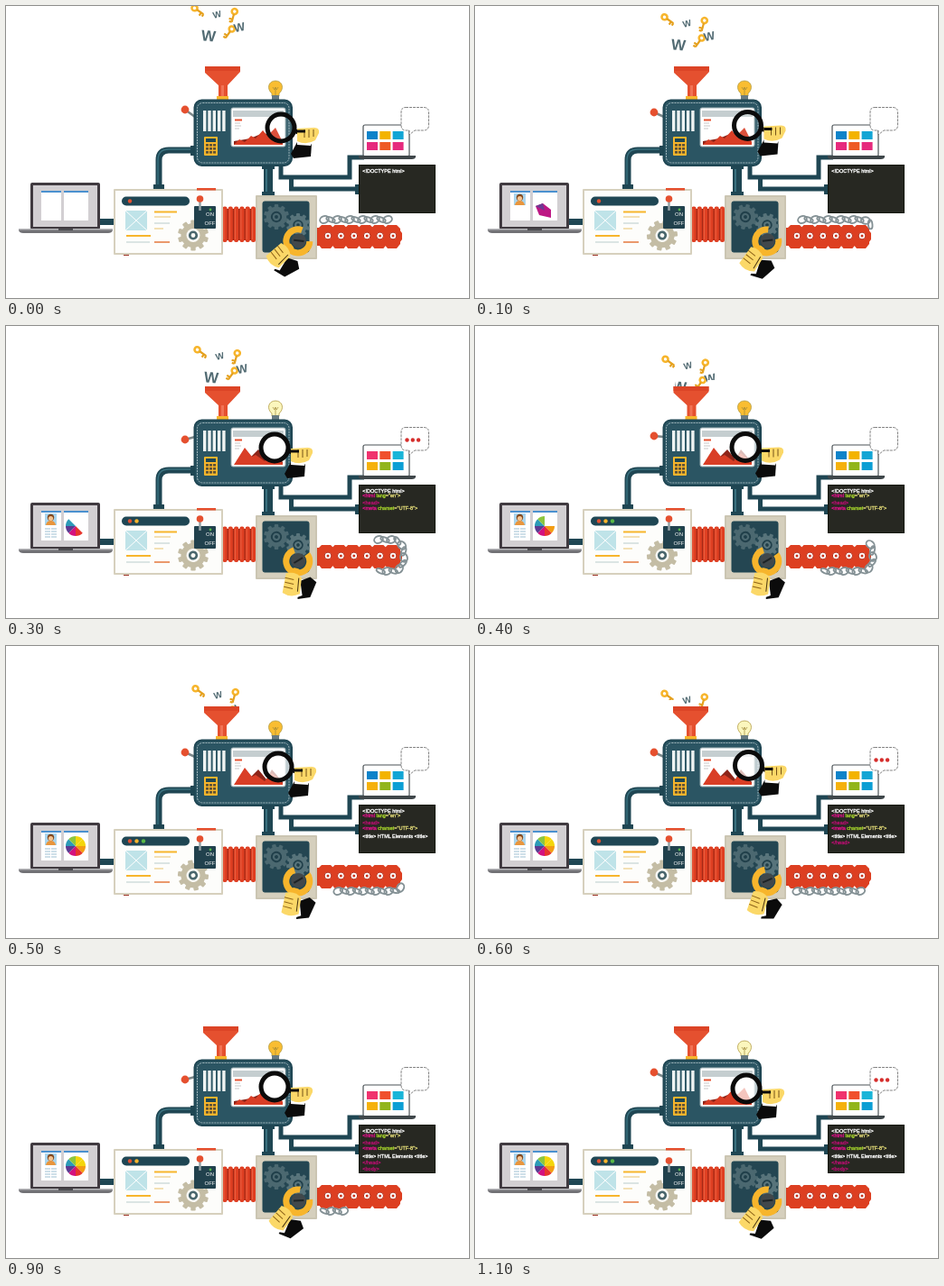
Animation, 512 px wide and 324 px high, one loop 1.2 s. Source, as an HTML page:

```html
<!DOCTYPE html>
<html lang="en">
<head>
<meta charset="utf-8">
<title>Web machine</title>
<style>
  html, body { margin: 0; width: 100%; height: 100%; overflow: hidden; background: #fff; }
  svg { display: block; width: 512px; height: 324px; }
  text { font-family: "Liberation Sans", Arial, sans-serif; }
</style>
</head>
<body>
<svg id="stage" viewBox="0 0 512 324"></svg>
<script>
const TEAL = '#2b5563', DARK = '#1f4653', RED = '#e5502f', BEIGE = '#d6d0bd';
const YELLOW = '#f7b52c', SKIN = '#fbd868', BLACK = '#0b0b0b';
const STEPS = 12, STEP_MS = 100;
const KEY_STEPS = [0, 2, 3, 5, 7, 9, 11];
const stage = document.getElementById('stage');

const rect = (x, y, w, h, fill, extra = '') =>
  `<rect x="${x}" y="${y}" width="${w}" height="${h}" fill="${fill}" ${extra}/>`;
const circle = (x, y, r, fill, extra = '') =>
  `<circle cx="${x}" cy="${y}" r="${r}" fill="${fill}" ${extra}/>`;
const path = (d, fill, extra = '') => `<path d="${d}" fill="${fill}" ${extra}/>`;
const line = (d, color, width, extra = '') =>
  path(d, 'none', `stroke="${color}" stroke-width="${width}" ${extra}`);
const group = (id, body, extra = '') => `<g id="${id}" ${extra}>${body}</g>`;
const repeat = (n, make) => Array.from({ length: n }, (_, i) => make(i)).join('');

function gear(id, x, y, r, fill, hub, core) {
  const teeth = repeat(10, i =>
    rect(-r * .16, -r, r * .32, r * .4, fill, `rx="1" transform="rotate(${i * 36})"`));
  return `<g transform="translate(${x} ${y})">` + group(id,
    teeth + circle(0, 0, r * .8, fill) + circle(0, 0, r * .44, hub) +
    circle(0, 0, r * .3, core) + circle(0, 0, r * .14, hub)) + '</g>';
}

function pipes() {
  return line('M208 160H180Q169 160 169 171V204', DARK, 7) +
    line('M208 159H180Q168 159 168 171V202', '#39707e', 1.5) +
    rect(204, 155, 5, 11, DARK) + rect(163, 198, 12, 5, DARK) +
    line('M290 176V211', DARK, 10) + line('M288 178V209', '#39707e', 2) +
    rect(283, 177, 14, 4, DARK) + rect(283, 206, 14, 4, DARK) +
    line('M304 177V190H380V168H396', DARK, 5) +
    line('M315.5 190V203H391', DARK, 5) + rect(386, 198, 4, 11, DARK) +
    rect(102, 236, 18, 7, DARK);
}

function leftLaptop() {
  const page = (x, w) => rect(x, 206, w, 32, '#fff') + rect(x, 205, w, 2, '#4a90cf');
  const colors = ['#f4d50b', '#f4d50b', '#f39c12', '#e7352c', '#d3127f', '#5b3a91', '#2c9ab8', '#8cc63f'];
  const slice = i => {
    const p = a => `${77 + 11 * Math.sin(a)} ${222 - 11 * Math.cos(a)}`;
    return path(`M77 222L${p(i * Math.PI / 4)}A11 11 0 0 1 ${p((i + 1) * Math.PI / 4)}Z`, colors[i], 'class="slice"');
  };
  const person = rect(43, 208, 13, 13, '#a9d5ee') + circle(49.5, 212.5, 3.7, '#83481d') +
    circle(49.5, 213.5, 2.6, '#f4c391') + path('M44 221q1-5 5.5-5t5.5 5z', '#e8963e');
  const notes = repeat(4, i => line(`M43 ${225 + i * 3}h13`, '#9dbfd2', 1, 'stroke-dasharray="6 1"'));
  return rect(27, 196, 77, 52, '#403a40', 'rx="2"') + rect(30, 199, 71, 46, '#d2cfd2') +
    page(39, 22) + page(64, 27) + group('person', person) + group('notes', notes) +
    group('bloom', path('M67 222l8-3 9 7v9l-13-3z', '#bd1784') + path('M67 222l8-3 2 8z', '#6d3a92')) +
    group('pie', repeat(8, slice)) +
    path('M14 247H118V249Q117 252 113 252H19Q15 252 14 249Z', '#727276') + rect(14, 247, 104, 1.5, '#b6b6b9') +
    rect(58, 247, 16, 2, '#4c4c50');
}

function controlBox() {
  return rect(119, 203, 121, 73, BEIGE, 'rx="1"') + rect(121, 205, 117, 69, '#fdfdfb') +
    rect(211, 202, 21, 2.5, RED) + rect(130, 276, 6, 1, '#9b3021') +
    rect(128, 211.5, 75, 10, DARK, 'rx="5"') +
    repeat(3, i => circle(137 + i * 7.5, 216.5, 2.2, [RED, YELLOW, '#58b947'][i], 'class="light"')) +
    rect(132, 227, 24, 22, '#bfe3e8') + line('M132 227l24 22m0-22l-24 22', '#fff', 1) +
    line('M164 228.5h25M133 255h27', YELLOW, 1.8) + line('M164 262h17', '#e5793c', 1.5) +
    line('M164 241h17M133 262h26', '#b9cccb', 1) + line('M164 234h18M164 247h10', '#e9c36c', 1) +
    gear('beigeGear', 207, 254.5, 17, '#c4bda5', '#fbfaf5', '#49666d') +
    rect(208, 222, 24, 25, '#21414d', 'rx="1"') +
    group('switch', line('M214.5 214V227', '#93a0a4', 2.5) + circle(214.5, 214, 3.8, RED)) +
    circle(226, 226, 1.4, '#53b84a') +
    `<text x="221" y="233" font-size="6" fill="#fff">ON</text><text x="219.5" y="243" font-size="6" fill="#fff">OFF</text>`;
}

function bellows() {
  return rect(239, 225, 38, 35, '#a52a17') +
    repeat(6, i => rect(239.5 + i * 6.3, 222.5, 5, 39.5, '#df3f22', 'rx="2"') +
      line(`M${241 + i * 6.3} 225v34`, '#ea6242', 1));
}

function wrenchBox() {
  const wrench = rect(-4, 8, 8, 24, YELLOW, 'rx="2"') +
    line('M-7 -11A13 13 0 1 0 8 -10', YELLOW, 7) +
    circle(0, -1, 8, '#41484b') + line('M-4 3L4 -5', '#1d2326', 2);
  const arm = path('M4 23L17 14L25 18L22 36L9 41Z', BLACK) + path('M2 25L7 20L13 36L7 40Z', '#fff') +
    path('M-10 16q10-5 18 1l2 18q-9 7-19 3z', SKIN) +
    line('M-10 21h10M-9 26h10M-9 31h10', '#8d6218', 1) + line('M5 18L7 33', '#4a3511', 1);
  return rect(276, 210, 68, 71, '#cbc5b2', 'rx="1"') + rect(278, 212, 64, 67, '#d5cfbd') +
    rect(284, 217, 51, 56, '#244652', `rx="2" stroke="${DARK}"`) +
    gear('gearA', 299, 234, 14, '#4b6870', '#203f4a', '#4b6870') +
    gear('gearB', 323, 243, 13, '#58747b', '#203f4a', '#58747b') + group('wrench', wrench + arm);
}

function conveyor() {
  const plate = i => {
    const x = 354 + i * 14.6;
    return path(`M${x - 9} 247l4-4h10l4 4v17l-4 5h-10l-4-5z`, '#dd3f21');
  };
  const bolt = i => circle(356 + i * 14.4, 255, 3.9, '#fff', 'stroke="#b52d19" stroke-width="1"') +
    circle(356 + i * 14.4, 255, 1.5, '#c9351d');
  return rect(344, 246, 88, 20, '#d33a1f') + repeat(6, plate) +
    path('M427 244h5l6 8v7l-6 8h-5z', '#dd3f21') + repeat(6, bolt) +
    line('M346 237H426Q440 237 440 255Q440 272 426 272H346', 'none', 0, 'id="chainPath"') + group('chain', '');
}

function machine() {
  const bulb = path('M298 83C290 83 288 92 294 97V100H302V97C308 92 306 83 298 83Z', '#fbf3ad', 'id="bulb" stroke="#b39c43" stroke-width=".8"') +
    line('M295 90l2 3 1-3 1 3 2-3M298 93v6', '#9e8739', .7) + rect(294, 99, 8, 5, '#687b80');
  const calculator = rect(219, 145, 15, 21, YELLOW, 'rx="1"') + rect(221, 147, 11, 4, DARK) +
    repeat(9, i => rect(221 + i % 3 * 4, 153 + Math.floor(i / 3) * 4, 3, 2.6, '#5d5136'));
  const screen = rect(249, 113, 60, 43, '#fff', 'rx="2" stroke="#9cafb3"') + rect(251, 116, 56, 7, '#c5ced0') +
    line('M253 126.5h8', RED, 2) + line('M253 130h6M253 133h7M253 136h5', '#c8c5c5', 1) +
    path('', '#8d2519', 'id="ridge"') + path('', '#d93e26', 'id="chart"');
  const lens = circle(0, 0, 15.5, '#fff', 'id="lens"') + circle(0, 0, 15, 'none', `stroke="${BLACK}" stroke-width="5"`);
  const hand = line('M14 3L24 7', BLACK, 5) + path('M18 16L34 18L33 32L14 34L11 29Z', BLACK) +
    path('M18 15L34 17L33 20L18 19Z', '#fff') +
    path('M18 1L37 0Q43 0 42 6L38 14Q28 20 18 15Z', SKIN) +
    line('M26 2v9M31 2v9M36 2v8', '#755318', 1) + line('M18 4h9', BLACK, 3);
  return line('', '#7b8789', 2.5, 'id="stem"') + circle(198, 0, 4.4, RED, 'id="knob"') +
    bulb + rect(208.5, 104.5, 107.5, 72.5, TEAL, `rx="8" stroke="${DARK}" stroke-width="2"`) +
    rect(211.5, 107.5, 101.5, 66.5, 'none', 'rx="6" stroke="#9fb5bb" stroke-width="1" stroke-dasharray="2 1"') +
    repeat(5, i => rect(218 + i * 5.3, 116, 3.4, 23, '#eef3f2')) + calculator + screen +
    group('magnifier', lens + hand);
}

function funnel() {
  return group('funnel', path('M220 67H259V73L245 88V101H235V88L220 74Z', RED) +
    path('M220 67H259V72H220Z', '#dc4426') + path('M238 88h3v13h-3z', '#f17254') + rect(233, 100, 13, 4, YELLOW));
}

function fallingItems() {
  const key = (x, y, a) => `<g transform="translate(${x} ${y}) rotate(${a})">` +
    circle(-3, 0, 3, 'none', `stroke="${YELLOW}" stroke-width="2.6"`) + line('M0 0H9M6 0V4M9 0V3', '#e5a11f', 2.2) + '</g>';
  const letter = (x, y, a, size) =>
    `<text transform="translate(${x} ${y}) rotate(${a})" text-anchor="middle" y="5" font-size="${size}" font-weight="bold" fill="#526b73">W</text>`;
  return `<clipPath id="mouth"><path d="M190 0H280V60H257V67H221V60H190Z"/></clipPath><g clip-path="url(#mouth)">` +
    group('items', key(211, 4, 35) + letter(233, 8, -15, 10) + key(252, 9, 105) +
      letter(224, 34, 5, 17) + key(248, 28, 125) + letter(258, 23, -12, 13)) + '</g>';
}

function rightLaptop() {
  return rect(395, 132, 51, 35, '#fff', 'rx="2" stroke="#4b5357" stroke-width="1.2"') +
    repeat(6, i => rect(399 + i % 3 * 14.3, i < 3 ? 139 : 151, 12, 9, '#fff', 'class="tile"')) +
    path('M390 166H453V168Q452 170 449 170H394Q391 170 390 168Z', '#3f474a') +
    path('M442 112.5H462Q467.5 112.5 467.5 118V132Q467.5 138 462 138H452L446 143V138H442Q437 138 437 132V118Q437 112.5 442 112.5Z',
      '#fff', 'stroke="#777" stroke-width=".9" stroke-dasharray="3 1"') +
    group('dots', repeat(3, i => circle(443.5 + i * 6.3, 126.5, 2.2, '#d52d2b')));
}

function terminal() {
  const PINK = '#e0128a', LIME = '#a6d52b', WHITE = '#fff', PLUM = '#b80f70';
  const rows = [
    [185.4, ['<!DOCTYPE html>', WHITE]],
    [190, ['<html ', PINK], ['lang', LIME], ['="en">', '#e5dd79']],
    [198, ['<head>', PLUM]],
    [204.3, ['<meta ', PINK], ['charset', LIME], ['="UTF-8">', '#e5dd79']],
    [213, ['<title> HTML Elements <title>', WHITE]],
    [220, ['</head>', PLUM]],
    [226.5, ['<body>', PLUM]],
  ];
  const escape = s => s.replace(/</g, '&lt;').replace(/>/g, '&gt;');
  return rect(390.5, 176.5, 84, 53, '#272822', 'stroke="#15180f"') + rows.map(([y, ...parts]) =>
    `<text class="code" x="394.3" y="${y}" font-size="5.5" xml:space="preserve">` + parts.map(([s, color]) =>
      `<tspan fill="${color}" stroke="${color}" stroke-width=".3">${escape(s)}</tspan>`).join('') + '</text>').join('');
}

stage.innerHTML = pipes() + leftLaptop() + bellows() + controlBox() + conveyor() + wrenchBox() +
  fallingItems() + funnel() + machine() + rightLaptop() + terminal();

const $ = id => document.getElementById(id);
const all = name => [...stage.querySelectorAll('.' + name)];
const lights = all('light'), tiles = all('tile'), slices = all('slice'), codeRows = all('code');
const chainLength = $('chainPath').getTotalLength();
const show = (node, on) => { node.style.display = on ? '' : 'none'; };
const set = (id, name, value) => $(id).setAttribute(name, value);
const transform = (id, value) => set(id, 'transform', value);

// Linear blend between the poses held at KEY_STEPS.
function pose(step, values) {
  const i = Math.max(1, KEY_STEPS.findIndex(k => k >= step));
  const u = (step - KEY_STEPS[i - 1]) / (KEY_STEPS[i] - KEY_STEPS[i - 1]);
  return values[i - 1] + (values[i] - values[i - 1]) * u;
}

function drawChain(step) {
  const tail = pose(step, [6, 26, 66, 120, 142, 184, 222]);
  const head = Math.min(chainLength, pose(step, [82, 116, 148, 196, 214, 214, 214]));
  let links = '';
  for (let s = tail, i = 0; s <= head; s += 7, i++) {
    const p = $('chainPath').getPointAtLength(s), q = $('chainPath').getPointAtLength(s + 1);
    const angle = Math.atan2(q.y - p.y, q.x - p.x) * 180 / Math.PI + (i % 2 ? 25 : -20);
    links += `<ellipse rx="5" ry="${i % 2 ? 2.3 : 3.8}" fill="none" stroke="#849195" stroke-width="1.9" transform="translate(${p.x} ${p.y}) rotate(${angle})"/>`;
  }
  $('chain').innerHTML = links;
}

function paintTiles(pair) {
  const cool = ['#0e83c9', '#f3b300', '#12a5d5'], warm = ['#f0326e', '#f0502c', '#1ab5d8'];
  const pinks = ['#e62a7d', '#ee5a24', '#e62a7d'], mixed = ['#f5b10c', '#91b51b', '#0b9ed4'];
  const top = [0, 2, 3].includes(pair) ? cool : warm;
  const bottom = pair === 0 ? pinks : mixed;
  tiles.forEach((tile, i) => tile.setAttribute('fill', [...top, ...bottom][i]));
}

function render(step) {
  const pair = Math.floor(step / 2), even = pair % 2 === 0;
  lights.forEach((light, i) => show(light, i <= pair % 3));
  set('bulb', 'fill', even ? '#f9bd32' : '#fbf6bd');
  show($('dots'), !even);
  paintTiles(pair);

  const turn = step * 12;
  transform('beigeGear', `rotate(${turn})`);
  transform('gearA', `rotate(${turn})`);
  transform('gearB', `rotate(${-turn})`);
  transform('wrench', `translate(323 261) rotate(${pose(step, [52, 25, 13, 15, 28, 43, 40])})`);
  transform('magnifier', `translate(${pose(step, [304, 299, 297, 301, 304, 297, 300])} ${pose(step, [135, 130, 135, 134, 131, 134, 136])})`);
  const knobY = pose(step, [115, 121, 126, 118, 118, 126, 118]);
  set('knob', 'cy', knobY);
  set('stem', 'd', `M198 ${knobY}L209 123`);
  transform('switch', `translate(0 ${step === 2 || step === 11 ? 2 : 0})`);
  transform('funnel', `translate(${pose(step, [0, 0, 0, -1, -1, -2, 0])} 0)`);
  transform('items', `translate(${pose(step, [0, 2, 3, 1, 1, 0, 0])} ${pose(step, [0, 20, 24, 45, 56, 75, 90])})`);

  const peaks = step >= 3 && step <= 8;
  set('ridge', 'd', peaks ? 'M262 154L279 137L288 148L294 137L306 151V154Z'
    : 'M252 154V150L270 147L284 141L297 144L306 151V154Z');
  set('chart', 'd', peaks
    ? 'M252 154L264 135L272 145L276 143L286 150L294 141L306 152V154Z'
    : 'M252 154L258 148L264 151L271 144L276 147L284 138L289 144L298 135L306 151V154Z');
  set('lens', 'fill-opacity', step === 3 || step === 9 ? 1 : step > 3 ? .7 : .1);

  show($('person'), step >= 1);
  show($('notes'), step >= 3);
  show($('bloom'), step === 1 || step === 2);
  show($('pie'), step >= 3);
  slices.forEach((slice, i) => show(slice, step >= 5 || (step === 3 ? i > 2 && i < 7 : i > 1)));
  const rowCount = [1, 1, 2, 4, 4, 5, 6][step] || 7;
  codeRows.forEach((row, i) => show(row, i < rowCount));
  drawChain(step);
}

const start = performance.now();
let shown = -1;
function tick(now) {
  const step = Math.floor(Math.max(0, now - start) / STEP_MS) % STEPS;
  if (step !== shown) render(shown = step);
  requestAnimationFrame(tick);
}
render(shown = 0);
requestAnimationFrame(tick);
</script>
</body>
</html>
```
